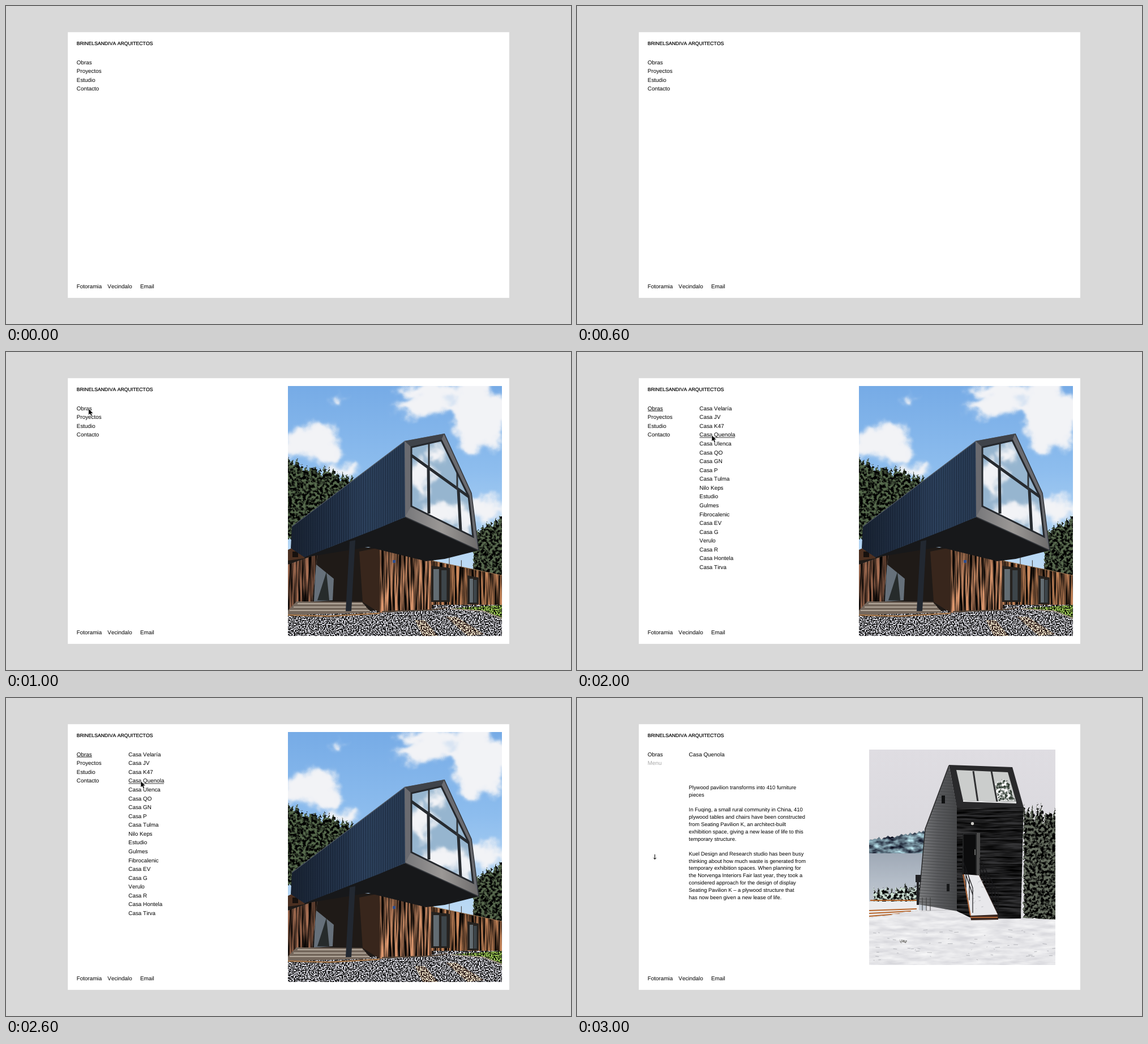
Recreate the animation shown at these times as an HTML page. Size 998 by 561 pixels, loop 4 s.

```html
<!DOCTYPE html>
<html lang="es">
<head>
<meta charset="utf-8">
<title>Estudio de arquitectura</title>
<style>
html, body { margin: 0; width: 100%; height: 100%; overflow: hidden; background: #d9d9d9; }
svg { display: block; width: 998px; height: 561px; }
text { font-family: "Liberation Sans", Arial, Helvetica, sans-serif; font-kerning: none; text-rendering: geometricPrecision; }
</style>
</head>
<body>
<svg id="stage" viewBox="0 0 998 561" xmlns="http://www.w3.org/2000/svg"></svg>
<script>
let seed = 7;
const rnd = () => (seed = (seed * 16807) % 2147483647) / 2147483647;
const mix = (a, b, t) => a + (b - a) * t;
const repeat = (n, fn) => Array.from({ length: n }, (_, i) => fn(i / (n - 1 || 1), i)).join('');

// Drawing helpers
const poly = (pts, fill, more = '') => `<polygon points="${pts}" fill="${fill}" ${more}/>`;
const box = (x, y, w, h, fill) => `<rect x="${x}" y="${y}" width="${w}" height="${h}" fill="${fill}"/>`;
const line = (d, color, w = 1) => `<path d="${d}" stroke="${color}" stroke-width="${w}" fill="none"/>`;
const group = (body, more) => `<g ${more}>${body}</g>`;
const use = id => `filter="url(#${id})"`;
const cut = (id, body) => group(body, `clip-path="url(#${id})"`);
const text = (x, y, s, size = 9.9, more = '') => `<text x="${x}" y="${y}" font-size="${size}" ${more}>${s}</text>`;
const column = (x, y, step, rows, size) => rows.map((s, i) => text(x, (y + i * step).toFixed(2), s, size)).join('');

// Definitions
const clip = (id, pts) => `<clipPath id="${id}"><polygon points="${pts}"/></clipPath>`;
const ramp = (id, down, ...stops) => `<linearGradient id="${id}" x2="${1 - down}" y2="${down}">${stops.map((c, i) =>
  `<stop offset="${i / (stops.length - 1)}" stop-color="${c}"/>`).join('')}</linearGradient>`;
const noise = (freq, n) => `<feTurbulence type="fractalNoise" baseFrequency="${freq}" numOctaves="3" seed="${n}" result="n"/>`;
const warp = (src, size) => `<feDisplacementMap in="${src}" in2="n" scale="${size}" xChannelSelector="R" yChannelSelector="G" result="s"/>`;
// Surface texture: grey noise laid over the shape, with optionally ragged edges
function grain(id, freq, gain, ragged = 0) {
  const row = `${gain} 0 0 0 ${.5 - gain / 2} `;
  return `<filter id="${id}" color-interpolation-filters="sRGB">${noise(freq, 5)}${warp('SourceGraphic', ragged)}
    <feColorMatrix in="n" values="${row.repeat(3)} 0 0 0 0 1"/><feBlend in2="s" mode="overlay"/>
    <feComposite in2="s" operator="in"/></filter>`;
}

function cloud(x, y, rx, ry) {
  return repeat(16, () => {
    const a = rnd() * 6.283, r = Math.sqrt(rnd()) * .8;
    return `<ellipse cx="${x + rx * r * Math.cos(a)}" cy="${y + ry * r * Math.sin(a)}" rx="${rx * .36}" ry="${ry * .36}" fill="#f2f3f6"/>`;
  });
}
// Ragged band whose top runs from (x0,y0) to (x1,y1)
function skyline(x0, y0, x1, y1, base, jag, fill, filter) {
  const n = Math.round((x1 - x0) / 4) + 1;
  const top = repeat(n, (t, i) => `${mix(x0, x1, t)},${mix(y0, y1, t) + (i % 2 ? rnd() : rnd() - 1) * jag} `);
  return poly(`${x0},${base} ${top}${x1},${base}`, fill, use(filter));
}
const stripes = (x0, x1, step, color, w) =>
  line(repeat(Math.ceil((x1 - x0) / step), (t, i) => `M${x0 + i * step} 60V500`), color, w);
const dashes = (n, x, y, w, h, color, len) =>
  line(repeat(n, () => `M${x + rnd() * w} ${y + rnd() * h}l${len * rnd()} ${2 * rnd() - 1}`), color, 1);
const door = (x, y, w, h) => poly(`${x},${y} ${x + w},${y + 4} ${x + w},${y + h} ${x},${y + h}`, '#25221f')
  + box(x + 4, y + 6, w * .3, h - 9, '#626c72') + box(x + w * .55, y + 8, w * .28, h - 11, '#3d454a');

const side = '505,308 705,157 705,291 660,310 527,362 503,346';
const glass = '716,168 769,156 817,254 825,326 716,272';
const hull = '657,119 671,193 671,376 603,364 613,250 615,231';

const defs = `<defs>
${clip('p1', '498.5,60 876,60 876,500.6 498.5,500.6')}${clip('p2', '516,91 844.8,91 844.8,470.7 516,470.7')}
${clip('side', side)}${clip('glass', glass)}${clip('hull', hull)}
${ramp('sky', 1, '#76abe6', '#8dbdee', '#b7d7f4', '#d7e8f5')}
${ramp('metal', 0, '#18212f', '#223146', '#2b3f5a', '#26384f')}
${ramp('sill', 0, '#77777a', '#9b9896', '#6d6b6b')}
${ramp('wood', 1, '#4e3526', '#74503a', '#6f4c37')}
${ramp('pale', 1, '#dfdde2', '#d9d8dd', '#e4e4e7')}
${ramp('water', 1, '#9fa9b6', '#b4bdc8', '#c6ccd4')}
${ramp('boards', 0, '#7d7e80', '#5a5b5e', '#464749')}
${grain('leaf', .2, 4, 9)}${grain('stone', .45, 4)}${grain('plank', '.3 .012', 2.4)}
${grain('snow', '.03 .14', .9, 4)}${grain('hill', '.06 .12', 1.5)}${grain('dark', '.02 .3', 2)}
<filter id="puff" x="-30%" y="-30%" width="160%" height="160%"><feGaussianBlur stdDeviation="4" result="b"/>
${noise(.035, 4)}${warp('b', 28)}</filter>
</defs>`;

function hillHouse() {
  const sky = box(498, 60, 378, 441, 'url(#sky)')
    + group(cloud(760, 84, 92, 30) + cloud(838, 120, 58, 70) + cloud(540, 162, 56, 36)
      + cloud(594, 210, 28, 12) + cloud(582, 87, 10, 7) + cloud(852, 280, 40, 22), use('puff'));
  const trees = skyline(490, 190, 615, 226, 330, 11, '#2b3526', 'leaf')
    + skyline(826, 318, 884, 288, 400, 9, '#2c3527', 'leaf');
  const ground = poly('498,440 876,440 876,501 498,501', '#737377', use('stone'))
    + poly('785,452 876,446 876,469 843,457', '#57702f', use('stone'))
    + group(poly('722,473 740,473 763,501 736,501', '#8a7b6d') + poly('777,467 796,467 845,498 815,501', '#8a7b6d'), use('stone'))
    + line('M785 453L843 457L876 470', '#a69b8c', 2);
  const lower = poly('498,362 560,345 755,345 755,452 498,461', '#1f1a17')
    + poly('547,374 579,400 577,438 544,440', '#66707a') + poly('550,438 566,388 571,438', '#262b2b')
    + poly('624,352 660,345 660,460 630,441', '#38261c')
    + group(poly('498,375 550,357 541,440 498,459', '#54382a')
      + poly('660,345 752,368 752,455 660,460', 'url(#wood)')
      + poly('752,368 876,394 876,446 752,446', '#68462f'), use('plank'))
    + line('M752 368L876 394', '#95714f', 1)
    + line(repeat(4, t => `M${mix(783, 847, t)} ${mix(375, 388, t)}v-12`), '#3b332d')
    + door(751, 377, 33, 64) + door(815, 394, 20, 51) + box(682, 350, 8, 4, '#c1b9ad') + box(683, 367, 5, 5, '#2d4f90')
    + poly('513,440 629,441 645,460 498,464 498,456', '#75685d')
    + line(repeat(3, (t, i) => `M${515 - 7 * i} ${444 + 6 * i}H${630 + 6 * i}`), '#b3a89b', 2)
    + line('M498 464L570 466L660 461', '#a07246', 2.5) + line('M664 458L752 455L780 451', '#56473a', 2);
  const kennel = poly('498,349 513,342 530,349 527,364 498,368', '#4c3021') + box(506, 352, 10, 10, '#17110e');
  const upper = poly('705,291 835,350 775,365 742,369 640,344 548,359 527,362', '#17181a')
    + poly(side, 'url(#metal)')
    + cut('side', stripes(507, 705, 3.9, '#141f31', 1) + stripes(609, 705, 3.9, '#3a516e', .6))
    + line('M505 308L705 157', '#4b535f', 1.5)
    + poly('704,157 774,144 822,249 835,350 705,291', '#6a6b70')
    + poly('704,157 774,144 769,155 716,168', '#3f434a')
    + poly('705,291 716,271 827,327 835,350', 'url(#sill)')
    + line('M774 144L822 249L835 350L705 291', '#34373c', 1.6);
  const panes = poly(glass, '#96b5cf')
    + group(cloud(735, 220, 20, 34) + cloud(775, 286, 42, 18) + cloud(808, 295, 14, 32) + cloud(760, 180, 16, 16), use('puff'))
    + line('M714 181L821 258M746 200L747 285M799 243L803 316', '#272b30', 5)
    + line('M747 160V202M797 205V243', '#31353a', 3);
  return sky + trees + ground + lower + kennel + upper + cut('glass', panes)
    + poly(glass, 'none', 'stroke="#25282d" stroke-width="3"')
    + poly('607,334 617,332 610,457 600,457', '#222831');
}

function snowCabin() {
  const view = box(516, 91, 329, 380, 'url(#pale)')
    + skyline(510, 251, 616, 236, 274, 3, '#647b89', 'hill')
    + box(516, 274, 100, 100, 'url(#water)')
    + skyline(524, 338, 608, 333, 362, 11, '#67716b', 'leaf')
    + skyline(789, 205, 852, 205, 394, 22, '#343831', 'leaf');
  const deck = box(516, 359, 88, 30, '#ececee')
    + line(repeat(3, (t, i) => `M516 ${375 + 5 * i}L${600 - 10 * i} ${372 + 4 * i}`) + 'M518 357H603', '#b7662c', 2);
  const snow = poly('510,388 573,379 603,375 671,376 700,384 790,388 850,391 850,480 510,480', '#e6e6e9', use('snow'))
    + dashes(60, 520, 408, 320, 55, '#b4b5ba', 9) + dashes(14, 570, 427, 12, 5, '#66655f', 4);
  const walls = poly(hull, 'url(#boards)')
    + cut('hull', line(repeat(52, t => `M600 ${mix(120, 384, t) - 4}L672 ${mix(120, 384, t)}`), '#404143', .7))
    + poly('671,193 789,193 784,389 700,390 671,376', '#1b1b1c', use('dark'))
    + line('M657 119L615 231L603 364', '#29292a', 1.5)
    + box(644, 172, 6, 14, '#101112') + box(653, 328, 5, 13, '#161718');
  const roof = poly('657,118 769,122 789,193 671,194', '#29292b')
    + poly('670,127 761,131 776,184 682,181', '#cbcdcc') + poly('738,152 757,142 773,180 744,181', '#979d98', use('leaf'))
    + line(repeat(2, t => `M${mix(700, 732, t)} 129l${mix(8, 10, t)} 54`), '#303133', 3)
    + line('M682 182L776 185', '#eeeeef', 2);
  const entry = box(681, 239, 30, 73, '#0c0c0d') + line('M682 310V240H705V311', '#37383a') + box(706, 238, 6, 75, '#4b4b4b')
    + line('M703 267V277', '#b8b8b6') + '<circle cx="698.5" cy="221.5" r="2.7" fill="#cac8c4"/>';
  const bridge = poly('682,311 711,313 744,382 744,391 696,392', '#3a2720')
    + poly('684,311 710,313 743,382 695,384', '#e8e8eb') + dashes(18, 693, 320, 22, 55, '#bfc0c5', 6)
    + line('M682 311L695 384M695 387H743', '#ad6538', 2)
    + line(repeat(7, t => `M${mix(712, 744, t)} ${mix(283, 345, t)}v${mix(28, 38, t)}`)
      + repeat(4, t => `M${mix(681, 699, t)} ${mix(282, 335, t)}v${mix(30, 44, t)}`)
      + repeat(3, (t, i) => `M711 ${282 + 10 * i}L744 ${345 + 12 * i}`)
      + repeat(2, (t, i) => `M680 ${282 + 10 * i}L699 ${335 + 12 * i}`), '#18181a', 1.2);
  const flue = box(598, 312, 9.5, 13, '#202124') + line('M602 324V365', '#202124', 4)
    + line(repeat(3, t => `M${mix(610, 624, t)} 352v23`), '#3a3a3b');
  return view + deck + snow + walls + roof + entry + bridge + flue;
}

const works = ['Casa Velaría', 'Casa JV', 'Casa K47', 'Casa Quenola', 'Casa Ulenca', 'Casa QO', 'Casa GN', 'Casa P',
  'Casa Tulma', 'Nilo Keps', 'Estudio', 'Gulmes', 'Fibrocalenic', 'Casa EV', 'Casa G', 'Verulo', 'Casa R', 'Casa Hontela', 'Casa Tirva'];
const story = ['Plywood pavilion transforms into 410 furniture', 'pieces', '',
  'In Fuqing, a small rural community in China, 410', 'plywood tables and chairs have been constructed',
  'from Seating Pavilion K, an architect-built', 'exhibition space, giving a new lease of life to this', 'temporary structure.', '',
  'Kuel Design and Research studio has been busy', 'thinking about how much waste is generated from',
  'temporary exhibition spaces. When planning for', 'the Norvenga Interiors Fair last year, they took a',
  'considered approach for the design of display', 'Seating Pavilion K – a plywood structure that', 'has now been given a new lease of life.'];
const pointer = (x, y) => group('<path d="M0 0V11.2L2.6 8.9L4.5 13L6.5 12.1L4.7 8.2H8.2Z" stroke="#fff" stroke-width=".6"/>',
  `transform="translate(${x} ${y})"`);
const left = 124.8, listX = 216.3, storyX = 197.6, rowY = 102.6, rowStep = 15.58, footY = 497.9;

// Each layer: one digit per second of the loop, 1 = shown
const layers = [
  ['1110', column(left, rowY + rowStep, rowStep, ['Proyectos', 'Estudio', 'Contacto'])],
  ['0110', cut('p1', hillHouse())],
  ['0010', column(listX, rowY, rowStep, works) + line('M125 104.2H152M216.5 150.9H279', '#000', .8)],
  ['0100', pointer(145.8, 100)],
  ['0010', pointer(238, 146.6)],
  ['0001', text(left, rowY + rowStep, 'Menu', 9.9, 'fill="#a9a9a9"') + text(storyX, rowY, works[3])
    + column(storyX, 160.6, 12.99, story, 9.4)
    + line('M137.5 275.8V284.3M135 281.8L137.5 284.5L140 281.8', '#000')
    + cut('p2', snowCabin())]
];

const stage = document.getElementById('stage');
stage.innerHTML = defs + box(109.2, 46.2, 779.7, 468.7, '#fff')
  + text(left, 68.7, 'BRINELSANDIVA ARQUITECTOS', 8.7, 'stroke="#000" stroke-width=".22"')
  + text(left, rowY, 'Obras')
  + text(left, footY, 'Fotoramia') + text(179.3, footY, 'Vecindalo') + text(237, footY, 'Email')
  + layers.map(([on, body]) => group(body, `class="layer" opacity="${on[0]}"`)).join('');

stage.querySelectorAll('.layer').forEach((el, i) => {
  const on = layers[i][0];
  const steps = [...on, on[3]].map((v, k) => ({ opacity: +v, offset: k / 4, easing: 'step-end' }));
  el.animate(steps, { duration: 4000, iterations: Infinity });
});
</script>
</body>
</html>
```
